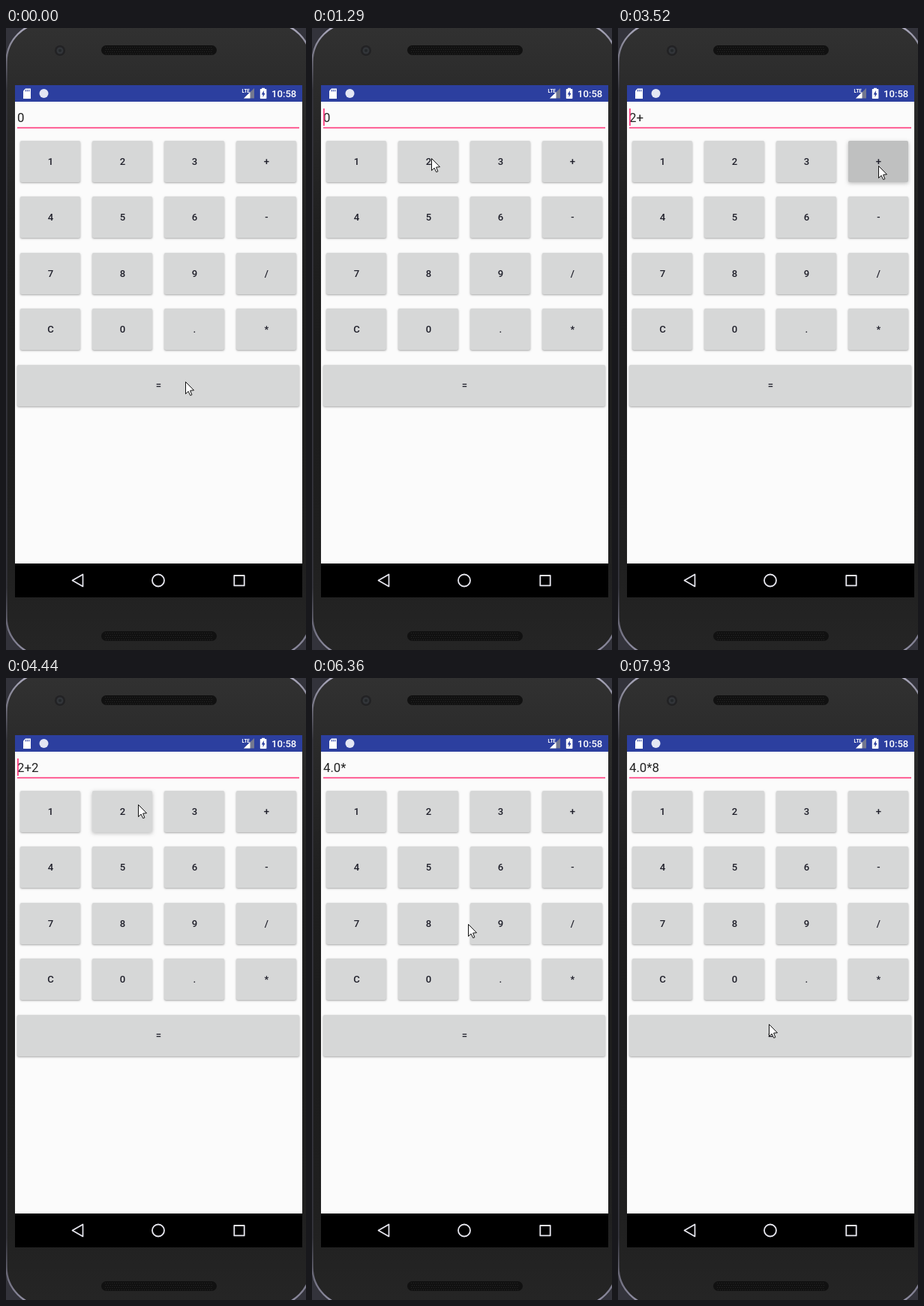
An HTML page with a canvas that plays this animation: 400 by 827 pixels, repeating every 8000 ms.

```html
<!DOCTYPE html>
<html lang="en">
<head>
<meta charset="utf-8">
<title>Phone calculator</title>
<style>
html, body { margin: 0; width: 100%; height: 100%; overflow: hidden; background: #222; }
canvas { display: block; width: 400px; height: 827px; }
</style>
</head>
<body>
<canvas id="stage"></canvas>
<script>
const W = 400, H = 827, LOOP = 8000;
const canvas = document.getElementById('stage');
const ctx = canvas.getContext('2d');
const dpr = window.devicePixelRatio || 1;
canvas.width = W * dpr;
canvas.height = H * dpr;

const BLUE = '#2c3f9f';
const PINK = '#ff4081';
const FONT = 'Roboto, sans-serif';

// pointer moves: from, until, x, y
const START = [239, 470];
const MOVES = [
  [120, 910, 158, 199], [1060, 1290, 159, 173], [1440, 2000, 169, 180], [2070, 2230, 184, 176],
  [2230, 2360, 216, 180], [2940, 3160, 388, 204], [3160, 3320, 347, 183], [3540, 3750, 219, 203],
  [3880, 4150, 164, 174], [4280, 4440, 176, 168], [4440, 4670, 218, 215], [4710, 5060, 355, 322],
  [5240, 5520, 350, 402], [5900, 6360, 208, 327], [6480, 6830, 187, 321], [6980, 7070, 184, 320],
  [7180, 7320, 174, 324], [7500, 7930, 201, 460]
];

// each press: key, time the display changes, new display
const TAPS = [
  { key: '2', at: 2170, shown: '2' },
  { key: '+', at: 3420, shown: '2+' },
  { key: '2', at: 4250, shown: '2+2' },
  { key: '*', at: 5830, shown: '4.0*' },
  { key: '8', at: 7420, shown: '4.0*8' }
];
const IDLE = { at: 170, shown: '0' };
const PRESS = 100, HOLD = 110, FADE = 80, BLINK = 500;

const KEYS = [...'123+456-789/C0.*'].map((label, i) => ({
  label, x: 19 + (i % 4) * 96, y: Math.round(149.6 + Math.floor(i / 4) * 74.5), w: 80, h: 55
}));
KEYS.push({ label: '=', x: 15, y: 448, w: 376, h: 55 });

const clamp = v => Math.max(0, Math.min(1, v));
const ease = v => v * v * (3 - 2 * v);

function box(x, y, w, h, r, fill) {
  ctx.beginPath();
  ctx.roundRect(x, y, w, h, r);
  ctx.fillStyle = fill;
  ctx.fill();
}

function disc(x, y, r, fill) {
  ctx.beginPath();
  ctx.arc(x, y, r, 0, Math.PI * 2);
  ctx.fillStyle = fill;
  ctx.fill();
}

function poly(points, fill) {
  ctx.beginPath();
  points.forEach(([x, y]) => ctx.lineTo(x, y));
  ctx.closePath();
  ctx.fillStyle = fill;
  ctx.fill();
}

function outline(color, width) {
  ctx.strokeStyle = color;
  ctx.lineWidth = width;
  ctx.stroke();
}

function label(str, x, y, size, weight, color, align = 'left') {
  ctx.font = `${weight} ${size}px ${FONT}`;
  ctx.textAlign = align;
  ctx.fillStyle = color;
  ctx.fillText(str, x, y);
}

// vertical gradient with evenly spaced colours
function fadeDown(...colors) {
  const g = ctx.createLinearGradient(0, 0, 0, H);
  colors.forEach((c, i) => g.addColorStop(i / (colors.length - 1), c));
  return g;
}

function speaker(x, y) {
  box(x, y, 154, 13, 6.5, '#111');
  ctx.fillStyle = '#262626';
  for (let row = 0; row < 4; row++) {
    for (let col = 0; col < 48; col++) {
      ctx.fillRect(x + 5 + col * 3 + row % 2, y + 2 + row * 3, 1, 1);
    }
  }
}

function drawBody() {
  ctx.fillStyle = '#33333b';
  ctx.fillRect(0, 0, W, H);
  box(0.5, -7, 406, 842, 52, fadeDown('#313131', '#272727', '#1f1f1f', '#1d1d1d', '#1d1d1d', '#1f1f1f', '#252525'));
  const side = '#34343c';
  outline(fadeDown('#a9a7ba', side, side, side, side, side, side, side, side, side, '#8e8ca0'), 2.4);

  disc(72, 30, 7, '#222224');
  disc(72, 30, 4.5, '#323539');
  disc(72, 30, 2, '#24272a');
  speaker(127, 23);
  speaker(127, 802);
}

function drawStatusBar() {
  ctx.fillStyle = BLUE;
  ctx.fillRect(12, 76, 383, 22);
  poly([[26, 80.5], [33, 80.5], [33, 94], [23, 94], [23, 83.5]], '#fff');
  ctx.fillStyle = BLUE;
  for (let x = 26; x < 32; x += 2.2) ctx.fillRect(x, 82, 1, 2.5);
  disc(50.5, 87, 6, '#e4e7f3');

  poly([[331, 80], [331, 93.5], [317, 93.5]], '#74788f');
  poly([[325.5, 85.3], [325.5, 93.5], [317, 93.5]], '#fff');
  label('LTE', 314.6, 86, 6.4, 700, '#fff');

  box(341, 79.8, 4, 2, 0, '#fff');
  box(338.8, 81, 8.6, 13, 0.8, '#fff');
  poly([[343.8, 83], [340.7, 88.4], [342.6, 88.4], [342.6, 92], [345.6, 86.7], [343.8, 86.7]], BLUE);
  label('10:58', 387.3, 92, 13.1, 500, '#fff', 'right');
}

function drawNav() {
  ctx.fillStyle = '#000';
  ctx.fillRect(12, 712, 383, 45);
  ctx.lineJoin = 'round';
  poly([[88.5, 734.5], [102.5, 726.5], [102.5, 742.5]], '#000');
  outline('#e8e8f0', 1.7);
  disc(203, 734.5, 8, '#000');
  outline('#e8e8f0', 1.8);
  box(304.3, 728, 13.4, 13.4, 0, '#000');
  outline('#e8e8f0', 1.8);
}

// the caret starts a new blink whenever the text changes
function drawDisplay(t) {
  const last = TAPS.filter(tap => t >= tap.at).pop() || IDLE;
  label(last.shown, 15, 125.3, 16.8, 400, '#212121');
  ctx.fillStyle = PINK;
  ctx.fillRect(15, 131.8, 376, 1.7);
  if (Math.floor((t - last.at) / BLINK) % 2 === 0) ctx.fillRect(15, 107, 1.8, 23);
}

function drawRipple(key, tap, t) {
  const age = t - tap.at + PRESS;
  const out = 1 - clamp((t - tap.at - HOLD) / FADE);
  const [x, y] = pointerAt(tap.at - PRESS);
  ctx.save();
  box(key.x, key.y, key.w, key.h, 2, `rgba(0,0,0,${0.05 * clamp(age / PRESS) * out})`);
  ctx.clip();
  disc(x, y, 28 * (age / 160) ** 3, `rgba(0,0,0,${0.06 * out})`);
  ctx.restore();
}

function drawKey(key, t) {
  const gone = HOLD + FADE * 2;
  const tap = TAPS.find(p => p.key === key.label && t >= p.at - PRESS && t < p.at + gone);
  const lift = tap ? clamp((t - tap.at) / PRESS + 1) * clamp((tap.at + gone - t) / FADE) : 0;

  ctx.save();
  ctx.shadowColor = `rgba(0,0,0,${0.34 - 0.08 * lift})`;
  ctx.shadowBlur = (2.5 + 3 * lift) * dpr;
  ctx.shadowOffsetY = (1 + 0.4 * lift) * dpr;
  box(key.x, key.y, key.w, key.h, 2, '#d6d7d7');
  ctx.restore();

  if (tap) drawRipple(key, tap, t);
  label(key.label, key.x + key.w / 2 + 0.4, key.y + 32, 13.1, 500, '#1f1f2a', 'center');
}

function pointerAt(t) {
  let [x, y] = START;
  for (const [from, until, toX, toY] of MOVES) {
    const k = ease(clamp((t - from) / (until - from)));
    x += (toX - x) * k;
    y += (toY - y) * k;
  }
  return [Math.round(x), Math.round(y)];
}

function drawPointer(t) {
  const [x, y] = pointerAt(t);
  ctx.save();
  ctx.translate(x + 0.5, y + 0.5);
  ctx.lineJoin = 'miter';
  poly([[0, 0], [0, 16], [3.6, 12.6], [6.2, 18], [8.4, 17.2], [6.1, 11.6], [11, 11.2]], '#fff');
  outline('#111', 1);
  ctx.restore();
}

function draw(t) {
  ctx.setTransform(dpr, 0, 0, dpr, 0, 0);
  drawBody();
  ctx.fillStyle = '#fbfbfb';
  ctx.fillRect(12, 76, 383, 681);
  drawStatusBar();
  drawNav();
  drawDisplay(t);
  KEYS.forEach(key => drawKey(key, t));
  drawPointer(t);
}

function tick() {
  draw(performance.now() % LOOP);
  requestAnimationFrame(tick);
}
tick();
</script>
</body>
</html>
```
